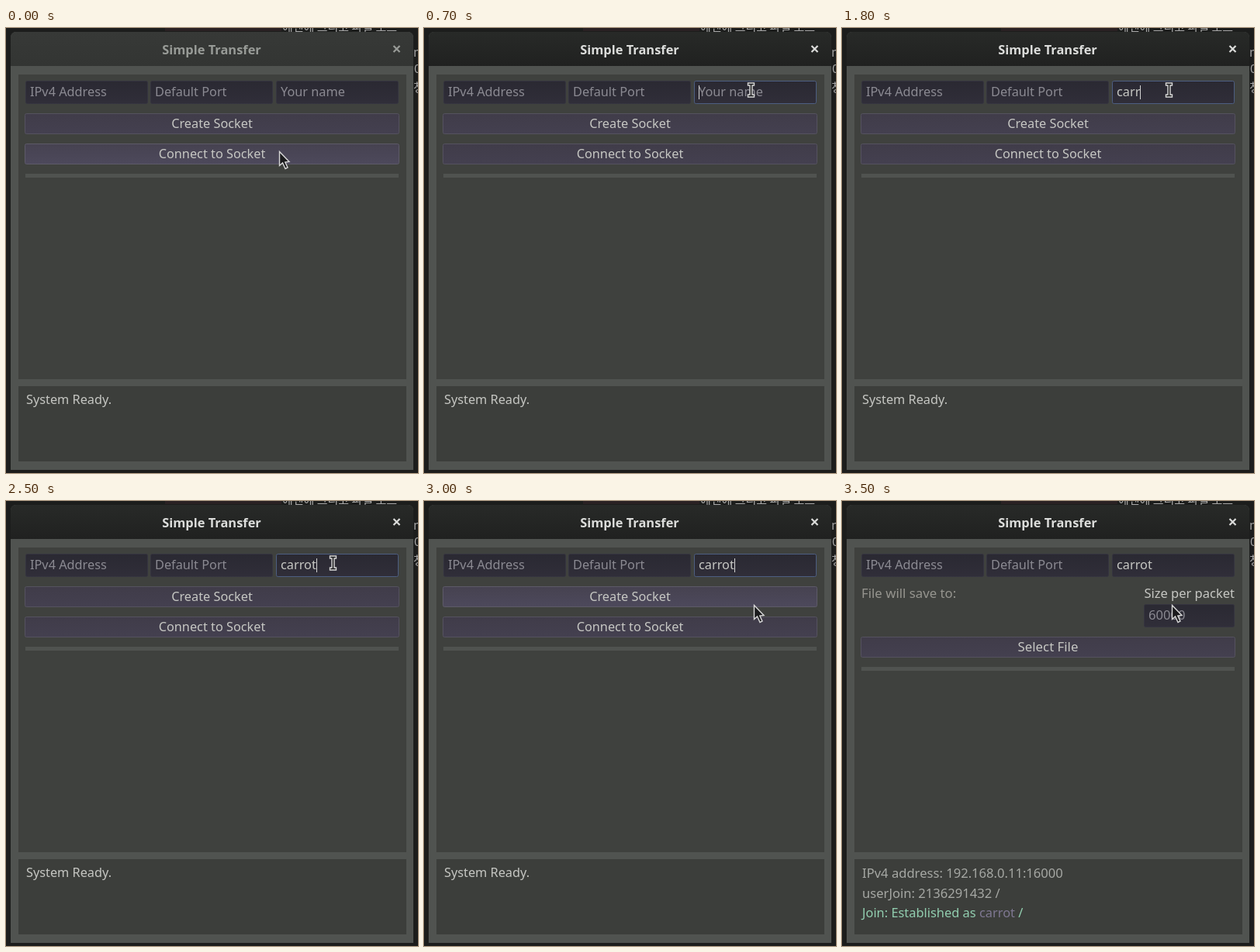
Recreate the animation shown at these times as an HTML page with a canvas. Size 531 px wide and 574 px high, loop 4.4 s.

```html
<!DOCTYPE html>
<html>
<head>
<meta charset="utf-8">
<style>
  html, body { margin: 0; width: 100%; height: 100%; overflow: hidden; background: #1c1d1c; }
  canvas { display: block; }
</style>
</head>
<body>
<canvas id="stage" width="531" height="574"></canvas>
<script>
const ctx = document.getElementById('stage').getContext('2d');
const LOOP = 4400, STEP = 100;
const UI = '"Noto Sans", sans-serif';
const LIGHT = '#c6c7c3', MUTED = '#8b8a92', FRAME = '#505350';
const USER = 'carrot';
const KEY_TIMES = [900, 1200, 1500, 1800, 1900, 2000];
// Pointer path: time, x, y
const PATH = [
  [0, 352, 159], [100, 364, 149], [200, 392, 120], [300, 414, 90], [400, 421, 80],
  [2500, 421, 80], [2600, 421, 88], [2700, 422, 108], [2800, 424, 130],
  [2900, 425, 141], [3000, 425, 134], [LOOP, 425, 134]
];

function pointerAt(t) {
  const i = PATH.findIndex(p => p[0] > t);
  const [t0, x0, y0] = PATH[i - 1], [t1, x1, y1] = PATH[i];
  const k = (t - t0) / (t1 - t0);
  return [x0 + (x1 - x0) * k, y0 + (y1 - y0) * k];
}

function rect(x, y, w, h, fill) {
  ctx.fillStyle = fill;
  ctx.fillRect(x, y, w, h);
}

function text(str, x, y, { color = LIGHT, size = 16.3, align = 'left', weight = 400, family = UI } = {}) {
  ctx.font = `${weight} ${size}px ${family}`;
  ctx.textAlign = align;
  ctx.fillStyle = color;
  ctx.fillText(str, x, y);
  return ctx.measureText(str).width;
}

function box(x, y, w, h, top, bottom, border) {
  const fill = ctx.createLinearGradient(0, y, 0, y + h);
  fill.addColorStop(0, top);
  fill.addColorStop(1, bottom);
  ctx.beginPath();
  ctx.roundRect(x + .5, y + .5, w - 1, h - 1, 2);
  ctx.fillStyle = fill;
  ctx.fill();
  ctx.strokeStyle = border;
  ctx.lineWidth = 1;
  ctx.stroke();
}

function field(x, y, w, focused) {
  box(x, y, w, 30, '#2a2932', '#302e39', focused ? '#4d5e82' : '#353440');
}

function button(label, y, state = 'normal', size) {
  const [top, bottom, border] = {
    normal: ['#403c49', '#444050', '#55525f'],
    hover: ['#464250', '#4d495c', '#5d5a68'],
    pressed: ['#08080b', '#1f1f2b', '#5b6b90']
  }[state];
  box(24, y, 483, 27, top, bottom, border);
  text(label, 265.5, y + 19, { align: 'center', size });
}

function backdrop() {
  rect(0, 0, 531, 574, '#1c1d1c');
  rect(205, 0, 150, 4, '#2a2123');
  const style = { color: '#a9a9a9', size: 15, family: '"Noto Sans CJK KR", "Noto Sans CJK", sans-serif' };
  text('에센에 그리고 파일 소스', 356, 4, style);
  text('no', 525, 37, style);
  text('0', 526, 58, style);
  text('청', 525, 82, style);
}

function windowFrame(active) {
  ctx.beginPath();
  ctx.roundRect(6, 5, 519, 565, [7, 7, 0, 0]);
  ctx.fillStyle = FRAME;
  ctx.fill();
  const bar = ctx.createLinearGradient(0, 5, 0, 49);
  bar.addColorStop(0, active ? '#282a28' : '#373937');
  bar.addColorStop(1, active ? '#202120' : '#333533');
  ctx.beginPath();
  ctx.roundRect(6, 5, 519, 44, [7, 7, 0, 0]);
  ctx.fillStyle = bar;
  ctx.fill();
  const color = active ? '#dcdddb' : '#989b97';
  text('Simple Transfer', 265, 34, { color, size: 16.4, align: 'center', weight: 700, family: '"Open Sans", sans-serif' });
  ctx.beginPath();
  for (const d of [-1, 1]) {
    ctx.moveTo(499.5, 27 - 4 * d);
    ctx.lineTo(507.5, 27 + 4 * d);
  }
  ctx.strokeStyle = color;
  ctx.lineWidth = 2.2;
  ctx.stroke();
  rect(16, 60, 500, 393, '#3f413e');
  rect(16, 462, 500, 97, '#3c3e3b');
}

function fields(t) {
  const focused = t >= 700 && t < 3200;
  field(25, 68, 158);
  field(186, 68, 158);
  field(348, 68, 158, focused);
  text('IPv4 Address', 31, 88, { color: MUTED });
  text('Default Port', 192, 88, { color: MUTED });
  const typed = USER.slice(0, KEY_TIMES.filter(k => t >= k).length);
  const width = text(typed || 'Your name', 354, 88, { color: typed ? LIGHT : MUTED });
  if (focused) rect(354 + (typed ? Math.round(width) : 0), 74, 1, 18, '#d2d2d2');
}

function setupView(t, y) {
  const hover = (top) => y >= top && y < top + 27 ? 'hover' : 'normal';
  button('Create Socket', 110, t >= 3200 ? 'pressed' : hover(110));
  button('Connect to Socket', 149, hover(149));
  rect(25, 188, 481, 5, FRAME);
  text('System Ready.', 26, 485);
}

function hostView() {
  text('File will save to:', 25, 125, { color: '#96958f', size: 16.8 });
  text('Size per packet', 506, 125, { align: 'right', size: 16.5 });
  field(389, 133, 117);
  text('60000', 395, 153, { color: MUTED, size: 16.6 });
  button('Select File', 175, 'normal', 16.8);
  rect(25, 214, 481, 5, FRAME);
  const log = { color: '#a6a8a4', size: 16.6 };
  text('IPv4 address: 192.168.0.11:16000', 26, 486, log);
  text('userJoin: 2136291432 /', 26, 512, log);
  let x = 26;
  for (const [part, color] of [['Join: Established as ', '#92cfb0'], [USER, '#7f7892'], [' /', '#92cfb0']])
    x += text(part, x, 537, { color, size: 16.4 });
}

function outline(points, x, y) {
  ctx.beginPath();
  for (const [dx, dy] of points) ctx.lineTo(x + dx, y + dy);
  ctx.closePath();
  ctx.fillStyle = '#1b1b1d';
  ctx.fill();
  ctx.strokeStyle = '#d8d8d8';
  ctx.lineWidth = 1.4;
  ctx.stroke();
}

function pointer(x, y) {
  if (y > 68 && y < 98) {
    const half = [[-4, -9], [4, -9], [4, -6], [1.5, -6], [1.5, 6], [4, 6], [4, 9]];
    outline([...half, [-4, 9], [-4, 6], [-1.5, 6], [-1.5, -6], [-4, -6]], x + .5, y);
  } else {
    outline([[0, 0], [0, 18], [4, 14.5], [7.5, 22], [10.5, 20.5], [7.3, 13.5], [12.5, 13]], x + .5, y + .5);
  }
}

function draw(now) {
  const t = Math.floor(now % LOOP / STEP) * STEP;
  const [x, y] = pointerAt(t);
  backdrop();
  windowFrame(t >= 700);
  fields(t);
  if (t < 3500) setupView(t, y);
  else hostView();
  pointer(x, y);
}

const start = performance.now();
function tick() {
  draw(performance.now() - start);
  requestAnimationFrame(tick);
}
tick();
</script>
</body>
</html>
```
